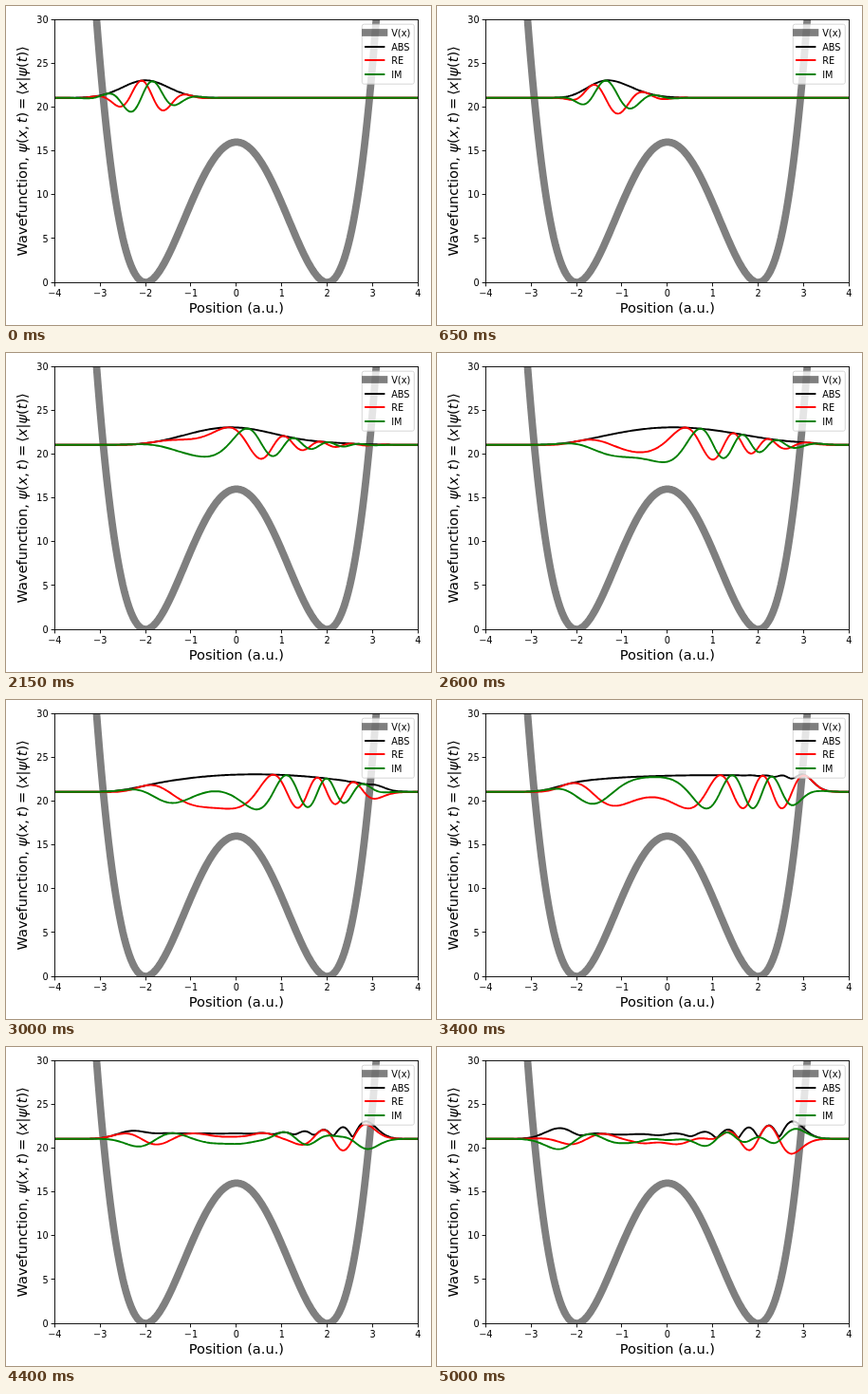
Animation of 448x336 px, one loop 5.05 s. Source, as an HTML page:

```html
<!DOCTYPE html>
<html lang="en">
<head>
<meta charset="utf-8">
<title>Wave packet in a double well</title>
<style>
  html, body { margin: 0; height: 100%; overflow: hidden; background: #fff; }
  svg { display: block; width: 100vw; height: 100vh; }
  text { font: 9.72px "DejaVu Sans", sans-serif; }
  .label { font-size: 14.58px; text-anchor: middle; }
  .math { font-style: oblique; }
  path, line { fill: none; stroke-width: 1.94; stroke-linejoin: round; }
  .well { stroke: #000; stroke-opacity: .5; stroke-width: 7.78; }
  .abs { stroke: #000; }
  .re { stroke: #f00; }
  .im { stroke: #008000; }
  .axis { stroke: #000; stroke-width: .9; fill: none; }
</style>
</head>
<body>
<svg viewBox="0 0 448 336">
  <clipPath id="plot"><rect x="51.3" y="14.1" width="383.1" height="277"/></clipPath>
  <g id="curves" clip-path="url(#plot)"></g>
  <rect class="axis" x="51.5" y="14.5" width="383" height="277"/>
  <g id="ticks"></g>
  <rect x="375.3" y="19.2" width="55" height="63" rx="2" fill="#fff" stroke="#ccc" opacity=".8"/>
  <g id="legend"></g>
  <text class="label" x="242.9" y="323">Position (a.u.)</text>
  <text class="label" transform="translate(22 152.8) rotate(-90)">Wavefunction, <tspan class="math">ψ</tspan>(<tspan class="math">x</tspan>,<tspan class="math" dx="2.84">t</tspan>)<tspan dx="2.84">=</tspan><tspan dx="2.84">⟨</tspan><tspan class="math">x</tspan>|<tspan class="math">ψ</tspan>(<tspan class="math">t</tspan>)⟩</text>
</svg>
<script>
const FRAME_MS = 50, FRAMES = 101;
const N = 256, BOX = 10, DX = BOX / N, DT = 0.01;
const X0 = -2, P0 = 6, ALPHA = 4;
const ENERGY = P0 * P0 / 2 + ALPHA / 4 + 8 / ALPHA + 0.75 / ALPHA ** 2;

const potential = x => (x * x - 4) ** 2;
const toX = x => 51.3 + (x + 4) * 383.1 / 8;
const toY = y => 291.1 - y * 277 / 30;
const grid = Array.from({ length: N }, (_, i) => i * DX - BOX / 2);

function add(parent, tag, attributes, text = "") {
  const node = document.createElementNS("http://www.w3.org/2000/svg", tag);
  for (const name in attributes) node.setAttribute(name, attributes[name]);
  node.textContent = text;
  return document.getElementById(parent).appendChild(node);
}

const pathOf = values =>
  "M" + grid.map((x, i) => toX(x).toFixed(2) + " " + toY(values[i]).toFixed(2)).join("L");

// Free-particle propagator over one step, as a periodic convolution kernel.
const kernelRe = new Float64Array(N), kernelIm = new Float64Array(N);
for (let d = 0; d < N; d++) {
  for (let m = -N / 2; m < N / 2; m++) {
    const k = 2 * Math.PI * m / BOX, phase = k * k * DT / 2;
    const wave = Math.cos(2 * Math.PI * m * d / N) / N;
    kernelRe[d] += Math.cos(phase) * wave;
    kernelIm[d] -= Math.sin(phase) * wave;
  }
}

function halfKick(re, im) {
  grid.forEach((x, i) => {
    const phase = potential(x) * DT / 2, c = Math.cos(phase), s = Math.sin(phase);
    [re[i], im[i]] = [re[i] * c + im[i] * s, im[i] * c - re[i] * s];
  });
}

function step({ re, im }) {
  const nextRe = new Float64Array(N), nextIm = new Float64Array(N);
  halfKick(re, im);
  for (let i = 0; i < N; i++) {
    let a = 0, b = 0;
    for (let j = 0; j < N; j++) {
      const d = Math.abs(i - j);
      a += kernelRe[d] * re[j] - kernelIm[d] * im[j];
      b += kernelRe[d] * im[j] + kernelIm[d] * re[j];
    }
    nextRe[i] = a;
    nextIm[i] = b;
  }
  halfKick(nextRe, nextIm);
  return { re: nextRe, im: nextIm };
}

// Each curve is scaled to a peak modulus of 2 and raised to the mean energy.
function curvePaths({ re, im }) {
  const abs = re.map((r, i) => Math.hypot(r, im[i]));
  const scale = 2 / Math.max(...abs);
  return [abs, re, im].map(part => pathOf(part.map(v => ENERGY + v * scale)));
}

const envelope = x => Math.exp(-ALPHA / 2 * (x - X0) ** 2);
let psi = {
  re: Float64Array.from(grid, x => envelope(x) * Math.cos(P0 * x)),
  im: Float64Array.from(grid, x => envelope(x) * Math.sin(P0 * x))
};
const frames = [];
for (let n = 0; n < FRAMES; n++) {
  frames.push(curvePaths(psi));
  psi = step(psi);
}

add("curves", "path", { class: "well", d: pathOf(grid.map(potential)) });
const curves = ["abs", "re", "im"].map(name => add("curves", "path", { class: name }));

for (let x = -4; x <= 4; x++) {
  const px = Math.floor(toX(x)) + 0.5;
  add("ticks", "path", { class: "axis", d: `M${px} 291.5v3.9` });
  add("ticks", "text", { x: toX(x), y: 306, "text-anchor": "middle" }, String(x).replace("-", "−"));
}
for (let y = 0; y <= 30; y += 5) {
  const py = Math.floor(toY(y)) + 0.5;
  add("ticks", "path", { class: "axis", d: `M51.5 ${py}h-3.9` });
  add("ticks", "text", { x: 44.6, y: Math.round(toY(y) + 3.7), "text-anchor": "end" }, y);
}

[["well", "V(x)"], ["abs", "ABS"], ["re", "RE"], ["im", "IM"]].forEach(([name, text], i) => {
  const y = Math.round(28 + 14.6 * i);
  add("legend", "line", { class: name, x1: 379, x2: 398.4, y1: y, y2: y, "stroke-linecap": "square" });
  add("legend", "text", { x: 406.2, y: y + 3.5 }, text);
});

let shown = -1;
function draw() {
  const index = Math.floor(performance.now() / FRAME_MS) % FRAMES;
  if (index !== shown) {
    curves.forEach((curve, i) => curve.setAttribute("d", frames[index][i]));
    shown = index;
  }
  requestAnimationFrame(draw);
}
draw();
</script>
</body>
</html>
```
